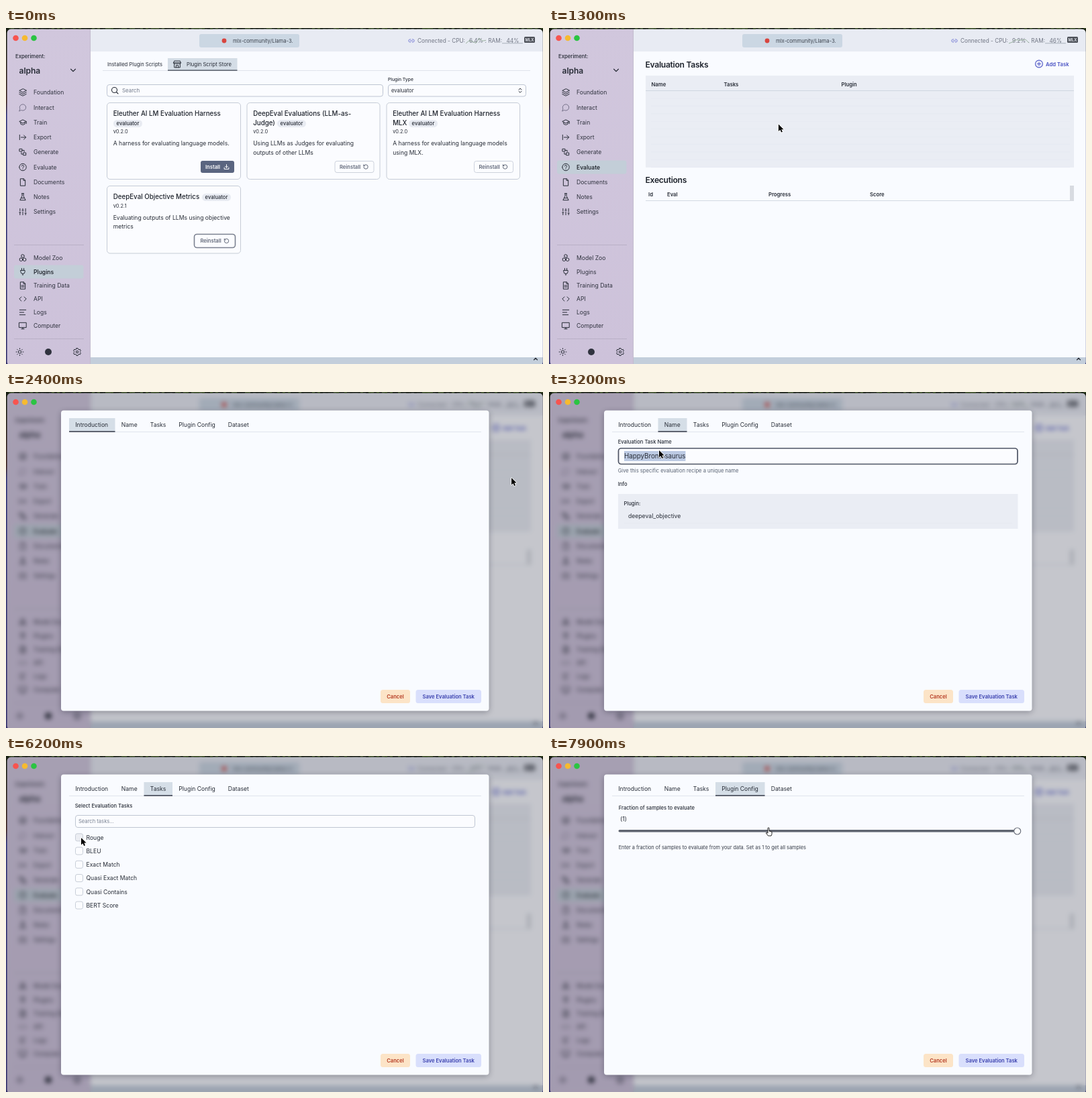
An HTML page with a canvas that plays this animation: 800x501 px, repeating every 8 s.

```html
<!DOCTYPE html>
<html lang="en">
<head>
<meta charset="utf-8">
<title>Evaluation task setup</title>
<style>
  html, body { margin: 0; width: 100%; height: 100%; overflow: hidden; background: #1c2616; }
  canvas { display: block; }
</style>
</head>
<body>
<canvas id="stage" width="800" height="501"></canvas>
<script>
const canvas = document.getElementById('stage');
const g = canvas.getContext('2d');
const LOOP = 8000, STEP = 100;

// moments of the story, in ms
const AT = {
  evaluate: 1000, menu: 1800, modal: 2400, name: 2800, focus: 3000, select: 3100,
  type: 3400, typed: 5600, tasks: 5800, check: 6400, config: 7500
};

const INK = '#272c36', SOFT = '#5b6474', EDGE = '#c6ccd6', PANEL = '#eaedf4', SHEET = '#f9fbff';
const BODY = 8.6, SMALL = 7.6, LARGE = 9.75;

const FILE = 'M14 2H5v20h14V7zM14 2v5h5';
const ICONS = {
  layers: 'M12 2 2 7l10 5 10-5zM2 12l10 5 10-5M2 17l10 5 10-5',
  chat: 'M7.9 20A9 9 0 1 0 4 16.1L2 22Z',
  cap: 'M22 9 12 4 2 9l10 5 10-5v6M6 11v5c3 3 9 3 12 0v-5',
  exit: 'M3 5v14M21 12H7M15 6l6 6-6 6',
  make: 'M3 3h7v7H3zM14 14h7v7h-7zM10 7h6v4M8 13v5h3',
  help: 'M2 12a10 10 0 1 0 20 0 10 10 0 1 0-20 0M9 9a3 3 0 0 1 6 1c0 2-3 2.5-3 4M12 17v.5',
  file: FILE,
  flask: 'M9 2h6M10 2v7L4 21h16L14 9V2M7 15h10',
  sliders: 'M4 21v-7M4 10V3M12 21v-9M12 8V3M20 21v-5M20 12V3M2 14h4M10 8h4M18 16h4',
  boxes: 'M12 2l4 2v5l-4 2-4-2V4zM7 12l4 2v5l-4 2-4-2v-5zM17 12l4 2v5l-4 2-4-2v-5z',
  plug: 'M12 22v-5M9 8V2M15 8V2M6 8h12v4a6 6 0 0 1-12 0z',
  page: FILE + 'M8 12h8M8 16h8',
  code: 'M16 18l6-6-6-6M8 6l-6 6 6 6',
  logs: 'M3 5h18M3 12h12M3 19h16',
  screen: 'M2 3h20v14H2zM8 21h8M12 17v4',
  sun: 'M8 12a4 4 0 1 0 8 0 4 4 0 1 0-8 0M12 2v2M12 20v2M2 12h2M20 12h2M5 5l1.4 1.4M17.6 17.6 19 19M5 19l1.4-1.4M17.6 6.4 19 5',
  gear: 'M9 12a3 3 0 1 0 6 0 3 3 0 1 0-6 0M10 2h4l1 3 2 1 3-1 2 4-2 2v2l2 2-2 4-3-1-2 1-1 3h-4l-1-3-2-1-3 1-2-4 2-2v-2l-2-2 2-4 3 1 2-1z',
  store: 'M4 10v11h16V10M2 8l2-5h16l2 5v1a3 3 0 0 1-5 1 4 4 0 0 1-5 0 4 4 0 0 1-5 0 3 3 0 0 1-5-1zM2 8h20M9 21v-6h6v6',
  search: 'M3 11a8 8 0 1 0 16 0 8 8 0 1 0-16 0M17 17l5 5',
  download: 'M12 3v12M7 10l5 5 5-5M3 15v6h18v-6',
  redo: 'M3 12a9 9 0 1 0 9-9 9.7 9.7 0 0 0-7 3L3 8M3 3v5h5',
  link: 'M9 17H7A5 5 0 0 1 7 7h2M15 7h2a5 5 0 0 1 0 10h-2M8 12h8',
  down: 'M6 9l6 6 6-6',
  up: 'M6 15l6-6 6 6',
  updown: 'M7 15l5 5 5-5M7 9l5-5 5 5',
  plus: 'M2 12a10 10 0 1 0 20 0 10 10 0 1 0-20 0M12 7v10M7 12h10',
  tick: 'M5 12l5 5 9-10'
};
const ARROW = new Path2D('M0 0V10.5L2.5 8.2 4.2 12 6 11.2 4.3 7.6H7.6Z');
const HAND = new Path2D('M3 .8a1 1 0 0 1 2 0V5l4 1v3.5L8 12H3.5L.4 8 1 7l2 1z');

const NAV = [
  ['Foundation', 'layers', 96], ['Interact', 'chat', 118.5], ['Train', 'cap', 141],
  ['Export', 'exit', 163], ['Generate', 'make', 185], ['Evaluate', 'help', 207.5],
  ['Documents', 'file', 230], ['Notes', 'flask', 252], ['Settings', 'sliders', 274],
  ['Model Zoo', 'boxes', 343], ['Plugins', 'plug', 363.5], ['Training Data', 'page', 384],
  ['API', 'code', 404], ['Logs', 'logs', 424], ['Computer', 'screen', 444]
];

function text(s, x, y, size = BODY, color = INK, weight = 400, align = 'left', spacing = 0) {
  g.font = `${weight} ${size}px Inter, sans-serif`;
  g.letterSpacing = spacing + 'px';
  g.textAlign = align;
  g.fillStyle = color;
  g.fillText(s, x, y);
}

function box(x, y, w, h, r, fill, stroke, width = 1) {
  g.beginPath();
  g.roundRect(x, y, w, h, r);
  if (fill) { g.fillStyle = fill; g.fill(); }
  if (stroke) { g.strokeStyle = stroke; g.lineWidth = width; g.stroke(); }
}

function line(x1, y1, x2, y2, color, width = 1) {
  g.beginPath();
  g.moveTo(x1, y1);
  g.lineTo(x2, y2);
  g.strokeStyle = color;
  g.lineWidth = width;
  g.stroke();
}

function dot(x, y, r, fill, stroke) {
  g.beginPath();
  g.arc(x, y, r, 0, Math.PI * 2);
  g.fillStyle = fill;
  g.fill();
  if (stroke) { g.strokeStyle = stroke; g.lineWidth = 1.2; g.stroke(); }
}

function icon(name, cx, cy, size = 13, color = INK, weight = 1) {
  const k = size / 24;
  g.save();
  g.translate(cx - size / 2, cy - size / 2);
  g.scale(k, k);
  g.strokeStyle = color;
  g.lineWidth = weight / k;
  g.lineCap = g.lineJoin = 'round';
  g.stroke(new Path2D(ICONS[name]));
  g.restore();
}

function shadow(color, blur, dy) {
  g.shadowColor = color;
  g.shadowBlur = blur;
  g.shadowOffsetY = dy;
}

function seeded(seed) {
  return () => {
    seed = (seed * 16807) % 2147483647;
    return seed / 2147483647;
  };
}

// pointer stops: time, x, y
const STOPS = [
  [100, 300, 505], [700, 77, 203], [1000, 77, 203], [1700, 750, 52], [1900, 750, 52],
  [2200, 753, 128], [2400, 753, 128], [2700, 186, 47], [2800, 186, 47], [3100, 164, 87],
  [5500, 164, 87], [5800, 226, 47], [5900, 226, 47], [6200, 112, 122], [6500, 112, 122],
  [7300, 284, 47], [7500, 284, 47], [7900, 323, 107]
];

function pointer(t) {
  if (t < STOPS[0][0] || (t >= AT.type && t < AT.typed)) return null;
  let i = 0;
  while (i < STOPS.length - 2 && t >= STOPS[i + 1][0]) i++;
  const [t0, x0, y0] = STOPS[i], [t1, x1, y1] = STOPS[i + 1];
  const p = Math.min(1, (t - t0) / (t1 - t0));
  const e = p * p * (3 - 2 * p);
  return { x: x0 + (x1 - x0) * e, y: y0 + (y1 - y0) * e };
}

function drawPointer(t, p) {
  const hand = t > AT.config && p.y > 95;
  g.save();
  g.translate(p.x, p.y);
  g.lineJoin = 'round';
  g.lineWidth = hand ? 0.9 : 1.6;
  g.strokeStyle = hand ? '#111' : '#fff';
  g.fillStyle = hand ? '#fff' : '#000';
  const shape = hand ? HAND : ARROW;
  if (hand) { g.fill(shape); g.stroke(shape); }
  else { g.stroke(shape); g.fill(shape); }
  g.restore();
}

function sidebar(t, p) {
  const tint = g.createLinearGradient(0, 0, 0, 501);
  tint.addColorStop(0, '#d1c7dd');
  tint.addColorStop(1, '#cdc2da');
  g.fillStyle = tint;
  g.fillRect(0, 0, 125, 501);
  line(125.5, 0, 125.5, 501, '#c3bccd');
  text('Experiment:', 14, 44.5, 7.75, INK, 500);
  text('alpha', 19.5, 67.5, 12, INK, 600);
  icon('down', 100, 63, 14, INK, 1.1);
  const current = t < AT.evaluate ? 'Plugins' : 'Evaluate';
  for (const [label, name, y] of NAV) {
    const on = label === current;
    const over = p && t < AT.modal && p.x < 116 && Math.abs(p.y - y) < 10;
    if (on) box(12, y - 10, 103.5, 20, 3, '#c3ced8');
    else if (over) box(11, y - 10, 105, 20, 3, '#f0eef6');
    icon(name, 25, y, 12.5, label === 'Interact' ? '#77728a' : INK);
    text(label, 41, y + 3.2, BODY, on ? '#14181f' : '#30333f', on ? 500 : 400);
  }
  line(12, 323.5, 116, 323.5, '#b9b0c6');
  line(12, 463.5, 116, 463.5, '#b9b0c6');
  icon('sun', 20.5, 483, 13);
  dot(63, 483, 5, '#30333f');
  icon('gear', 106, 483, 13);
}

function topBar(t) {
  g.fillStyle = '#e8ebf3';
  g.fillRect(126, 0, 674, 35);
  box(288, 9, 149, 20, 3, '#cbd7e3');
  dot(325, 19, 3.4, '#d8453f');
  text('mlx-community/Llama-3.', 338, 22, SMALL, '#3c424d');
  const cpu = t < 500 ? '6.4%' : t < 1500 ? '9.2%' : '7.6%';
  const gray = '#717684';
  icon('link', 604, 19, 10, '#7c82d6');
  text('Connected - CPU:', 613, 22, 8.25, gray);
  text(cpu, 690, 22, 8.25, gray);
  text('. RAM:', 713.5, 22, 8.25, gray);
  text(t < 500 ? '44%' : '46%', 745.5, 22, 8.25, gray);

  const rnd = seeded(11 + Math.floor((t + 500) / 1000) * 97);
  g.beginPath();
  for (let x = 685; x <= 716; x += 5) g.lineTo(x, 23 - rnd() * 9);
  g.strokeStyle = '#86a389';
  g.lineWidth = 0.8;
  g.stroke();
  line(739, 22.8, 770, 22.8, '#9aa2ad', 0.8);
  box(772, 13, 16, 9, 1.5, '#4c5058');
  text('MLX', 780, 19.8, 5.8, '#e8ebf3', 600, 'center');
}

function chip(x, y) {
  box(x, y - 8, 43, 11, 5.5, '#e8ebf2');
  text('evaluator', x + 21.5, y, SMALL, INK, 500, 'center');
}

function reinstall(x, y, focused) {
  if (focused) box(x - 0.5, y - 0.5, 61, 20, 4, null, '#7b8190', 1.6);
  else box(x + 0.5, y + 0.5, 58, 17, 3, null, '#cdd2dc');
  text('Reinstall', x + (focused ? 8.5 : 7.5), y + (focused ? 12.3 : 11.8), SMALL, '#626979', 600);
  icon('redo', x + (focused ? 47.5 : 46.5), y + (focused ? 9.5 : 9), 8.5, '#626979');
}

function card(x, y, w, h, title, version, about) {
  box(x + 0.5, y + 0.5, w - 1, h - 1, 4.5, '#fbfcff', EDGE);
  const left = x + 9.7;
  title.forEach((s, i) => text(s, left, y + 20 + i * 14, LARGE, '#1d222b', 500));
  const vy = y + (h > 110 ? 46 : 32.5);
  text(version, left, vy, 7.4);
  about.forEach((s, i) => text(s, left, vy + 18.3 + i * 13.2));
}

function pluginPage() {
  text('Installed Plugin Scripts', 151, 56.5, SMALL + 0.05);
  box(241, 45, 103.5, 18.5, 0, '#d4dde6');
  line(144, 63.5, 781, 63.5, '#dfe3eb');
  line(241, 63.2, 344.5, 63.2, '#3c4250', 1.3);
  icon('store', 255, 54, 13);
  text('Plugin Script Store', 269, 56.5, SMALL + 0.05);

  box(150.5, 84.5, 411, 17.5, 3.5, '#fbfcff', '#bec5d2');
  icon('search', 162, 93, 12, INK, 1.1);
  text('Search', 173, 96.3, 7.9, '#727a8a');
  text('Plugin Type', 569, 79, 6.75, INK, 500);
  box(569.5, 84.5, 205, 17.5, 3.5, '#fbfcff', '#bec5d2');
  text('evaluator', 574, 96.2, SMALL + 0.1);
  icon('updown', 766, 93.2, 9.5);

  const harness = 'Eleuther AI LM Evaluation Harness';
  card(150, 111, 200, 115, [harness], 'v0.2.0', ['A harness for evaluating language models.']);
  card(358.5, 111, 199, 115, ['DeepEval Evaluations (LLM-as-', 'Judge)'], 'v0.2.0',
    ['Using LLMs as Judges for evaluating', 'outputs of other LLMs']);
  card(566.5, 111, 199.5, 115, [harness, 'MLX'], 'v0.2.0',
    ['A harness for evaluating language models', 'using MLX.']);
  card(150, 235, 200, 101.5, ['DeepEval Objective Metrics'], 'v0.2.1',
    ['Evaluating outputs of LLMs using objective', 'metrics']);
  chip(160, 145);
  chip(404, 145);
  chip(600, 145);
  chip(292, 255);
  box(290, 198, 50, 18, 3, '#5a6580');
  text('Install', 297, 210, SMALL, '#fff', 600);
  icon('download', 328.5, 207, 9, '#fff');
  reinstall(489.5, 198);
  reinstall(697, 198);
  reinstall(281, 308, true);
}

function evaluatePage(t, p) {
  text('Evaluation Tasks', 143.5, 58.7, 12.1, '#1d222b', 600, 'left', -0.28);
  icon('plus', 730, 53.5, 13, '#4a53c4', 1.1);
  text('Add Task', 740, 56.5, SMALL + 0.1, '#4a53c4', 600);
  box(144, 71, 638, 137, 0, PANEL);
  for (let y = 105; y < 208; y += 11.4) line(152, y, 776, y, '#e6eaf2');
  line(144, 93.5, 782, 93.5, '#cfd6e0');
  const heads = [['Name', 152.5, 86.8], ['Tasks', 260.5, 86.8], ['Plugin', 435.5, 86.8],
    ['Id', 148, 250.5], ['Eval', 176, 250.5], ['Progress', 327, 250.5], ['Score', 478, 250.5]];
  text('Executions', 143.5, 231, 12.1, '#1d222b', 600, 'left', -0.28);
  for (const [s, x, y] of heads) text(s, x, y, SMALL + 0.1, INK, 600);
  line(144, 257.5, 777, 257.5, '#d3d9e2');
  box(776, 235, 6, 23, 0, '#d8dbe1');
  if (t >= AT.menu && t < AT.modal) menu(p);
}

function menu(p) {
  g.save();
  shadow('rgba(30,36,50,.25)', 7, 2);
  box(623.5, 65.5, 180, 67.5, 3, '#fcfdff', '#d3d8e1');
  g.restore();
  const rows = ['DeepEval Evaluations (LLM-as-Judge)', 'Eleuther AI LM Evaluation Harness MLX', 'DeepEval Objective Metrics'];
  rows.forEach((s, i) => {
    const y = 79 + i * 20.2, last = i === 2 && p.y > y;
    if (Math.abs(p.y - y) < 10 || last) box(624, y - 10, 176, 20.5, 0, '#eceff4');
    text(s, 631, y + 3.1);
  });
}

const TABS = [['Introduction', 94, 68.5], ['Name', 162.5, 43], ['Tasks', 205.5, 42.5],
  ['Plugin Config', 248, 73.5], ['Dataset', 321.5, 50]];

function modal(t) {
  g.save();
  shadow('rgba(25,30,45,.35)', 10, 2);
  box(82, 27.5, 637.5, 448, 4, SHEET);
  g.restore();
  const active = t < AT.name ? 0 : t < AT.tasks ? 1 : t < AT.config ? 2 : 3;
  line(94, 59.5, 708, 59.5, '#e1e5ed');
  TABS.forEach(([s, x, w], i) => {
    if (i === active) {
      box(x, 39, w, 20, 0, '#d5dee7');
      line(x, 59, x + w, 59, '#343947', 1.3);
    }
    text(s, x + 9.3, 51.7);
  });
  [null, namePane, tasksPane, configPane][active]?.(t);
  box(558, 444, 44, 20, 3.5, '#fce4c7');
  text('Cancel', 580, 456.8, SMALL, '#b53a22', 600, 'center');
  box(610.5, 444, 97.5, 20, 3.5, '#d9dffc');
  text('Save Evaluation Task', 659.2, 456.8, SMALL, '#3a40ae', 600, 'center');
}

function namePane(t) {
  text('Evaluation Task Name', 102.7, 77.2, SMALL, INK, 500);
  const focused = t >= AT.focus;
  box(103.5, 84, 594.5, 23.5, 4, '#fbfcff', focused ? '#4e5464' : EDGE, focused ? 1.7 : 1);
  const typed = 'EvalObjectiveTest'.slice(0, 1 + Math.floor((t - AT.type) / 130));
  const value = t < AT.type ? 'HappyBrontosaurus' : typed;
  g.font = `400 ${LARGE}px Inter, sans-serif`;
  g.letterSpacing = '0px';
  const w = g.measureText(value).width;
  if (t >= AT.select && t < AT.type) box(112, 88, w, 15, 0, '#bccae3');
  text(value, 112, 99.2, LARGE);
  if (t >= AT.type) line(112.6 + w, 90, 112.6 + w, 101.5, '#20242c', 0.8);
  text('Give this specific evaluation recipe a unique name', 102.7, 119.7, SMALL, SOFT);
  text('Info', 102.7, 140, SMALL, INK, 500);
  box(103, 152, 595.5, 52, 0, PANEL);
  text('Plugin:', 111.5, 169.2, SMALL, INK, 500);
  line(112, 195.5, 690, 195.5, '#e6e9f1');
  text('deepeval_objective', 118, 188.3, BODY + 0.05);
}

function tasksPane(t) {
  text('Select Evaluation Tasks', 102.7, 77.2, SMALL, INK, 500);
  box(103.5, 88.5, 595, 18, 3.5, '#fbfcff', '#bfc6d2');
  text('Search tasks...', 108, 100.3, SMALL, '#7a8292');
  const names = ['Rouge', 'BLEU', 'Exact Match', 'Quasi Exact Match', 'Quasi Contains', 'BERT Score'];
  const p = pointer(t);
  names.forEach((s, i) => {
    const y = 121.3 + i * 20.25;
    const over = p && p.x < 200 && Math.abs(p.y - y) < 9;
    const on = i === 0 && t >= AT.check;
    box(103.5, y - 5.5, 11, 11, 2.5, on ? '#5a6580' : over ? '#eceef3' : '#fbfcff', on ? '#5a6580' : '#c8ced8');
    if (on) icon('tick', 109, y, 9, '#fff', 1.2);
    text(s, 119.5, y + 3.2);
  });
}

function configPane() {
  text('Fraction of samples to evaluate', 103.7, 80.4, SMALL, INK, 500);
  text('(1)', 106, 96.8, BODY + 0.2);
  box(103.5, 110, 594, 3.6, 1.8, '#5f6470');
  dot(697.7, 112, 5, '#fcfdff', '#6b707c');
  text('Enter a fraction of samples to evaluate from your data. Set as 1 to get all samples', 103.7, 138.6, 7.33, '#343a45');
}

function backdrop() {
  g.save();
  g.filter = 'blur(3.6px)';
  g.drawImage(canvas, 0, 0);
  g.restore();
  g.fillStyle = 'rgba(30,33,42,.24)';
  g.fillRect(0, 0, 800, 501);
}

// thin strip of desktop around the window
function desktop() {
  g.save();
  g.beginPath();
  g.rect(0, 0, 800, 501);
  g.roundRect(1.6, 1.6, 798.2, 502, 6);
  g.clip('evenodd');
  const wall = g.createLinearGradient(0, 0, 0, 501);
  wall.addColorStop(0, '#1a2114');
  wall.addColorStop(0.22, '#3a211c');
  wall.addColorStop(0.26, '#2b2f75');
  wall.addColorStop(1, '#33306b');
  g.fillStyle = wall;
  g.fillRect(0, 0, 800, 501);
  const rnd = seeded(5);
  for (let x = 0; x < 800; x += 4) {
    g.fillStyle = rnd() > 0.6 ? '#3d5226' : '#161c12';
    g.fillRect(x, 0, 4, 1 + rnd());
  }
  g.restore();
  dot(14.5, 15, 4.3, '#f7544f');
  dot(28, 15, 4.3, '#f6ba30');
  dot(41.5, 15, 4.3, '#2bc442');
}

function draw(t) {
  const p = pointer(t);
  g.fillStyle = SHEET;
  g.fillRect(0, 0, 800, 501);
  sidebar(t, p);
  topBar(t);
  if (t < AT.evaluate) pluginPage();
  else evaluatePage(t, p);
  g.fillStyle = '#c3cedb';
  g.fillRect(126, 491, 674, 10);
  icon('up', 789, 493.5, 10, INK, 1.2);
  if (t >= AT.modal) {
    backdrop();
    modal(t);
  }
  desktop();
  if (p) drawPointer(t, p);
}

const start = performance.now();
let shown = -1;
function tick() {
  const t = Math.floor(((performance.now() - start) % LOOP) / STEP) * STEP;
  if (t !== shown) draw(shown = t);
  requestAnimationFrame(tick);
}
tick();
</script>
</body>
</html>
```
